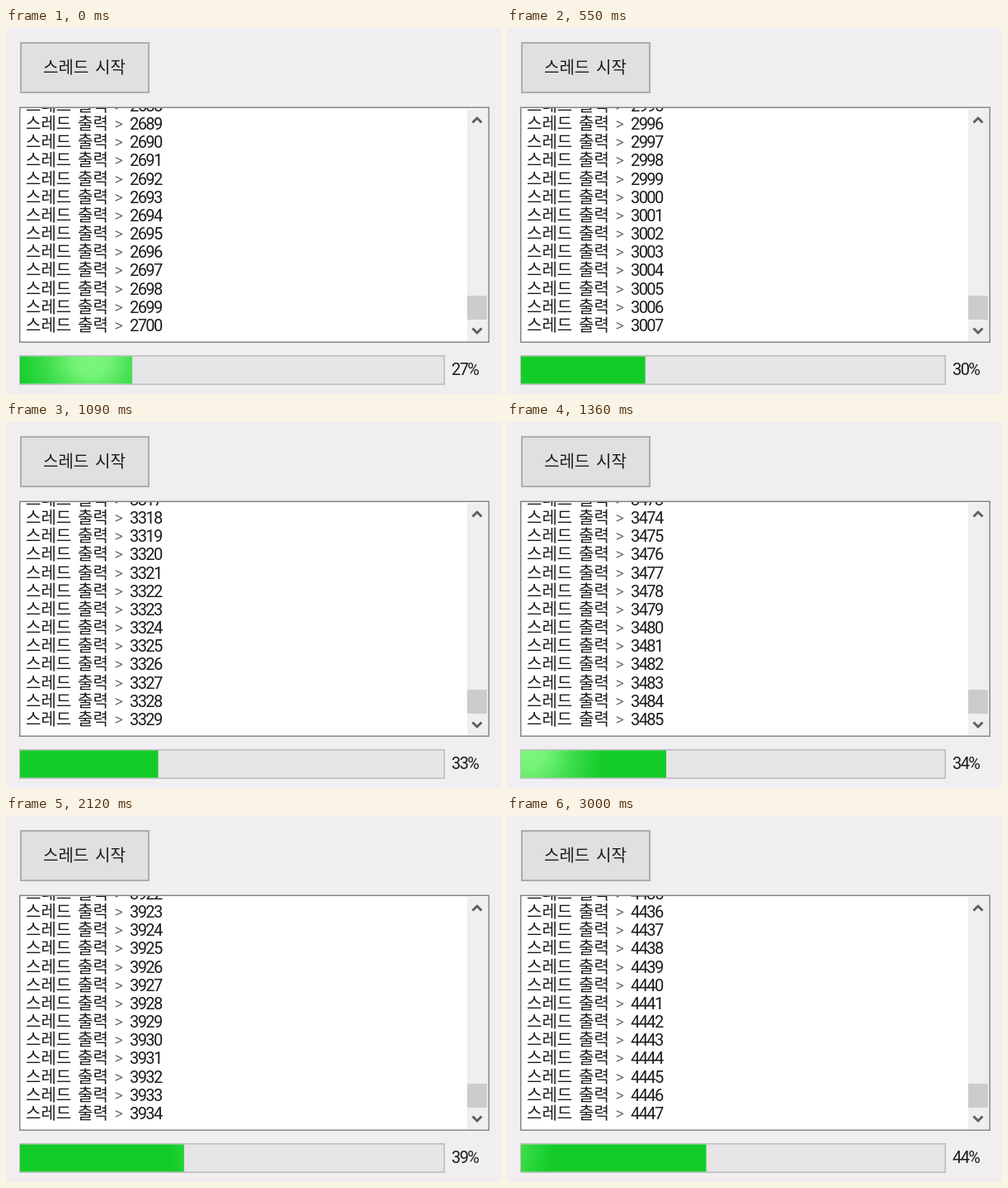
These frames come from a looping animation (600 px wide and 443 px high, 3030 ms). An HTML page:

```html
<!DOCTYPE html>
<html lang="ko">
<head>
<meta charset="utf-8">
<title>스레드 출력</title>
<style>
  html, body { margin: 0; width: 100%; height: 100%; overflow: hidden; background: #f0eef0; }
  svg { display: block; width: 600px; height: 443px; }
  text { font: 20px "Noto Sans CJK KR", "Noto Sans CJK", "Noto Sans CJK JP", sans-serif; fill: #1c1c1c; }
  .num { font: 20px Roboto, "Liberation Sans", sans-serif; letter-spacing: -1.6px; }
  .gt { font: 300 20px Roboto, "Liberation Sans", sans-serif; fill: #444; }
  .arrow { fill: none; stroke: #606060; stroke-width: 3; }
</style>
</head>
<body>
<svg viewBox="0 0 600 443">
  <defs>
    <clipPath id="view"><rect x="18" y="97" width="540" height="282"/></clipPath>
    <radialGradient id="glow" gradientUnits="userSpaceOnUse" cx="0" cy="0" r="1">
      <stop offset="0" stop-color="#7cf67e"/>
      <stop offset=".22" stop-color="#74f377"/>
      <stop offset=".6" stop-color="#3cdd4a"/>
      <stop offset="1" stop-color="#13cc28"/>
    </radialGradient>
  </defs>

  <rect x="18" y="18" width="155" height="60" fill="#e1e0e1" stroke="#adadad" stroke-width="2"/>
  <text y="55"><tspan x="45">스레드</tspan><tspan x="108">시작</tspan></text>

  <rect x="16.75" y="96.25" width="568.5" height="284" fill="#fff" stroke="#85858a" stroke-width="1.5"/>
  <rect x="559" y="98" width="25" height="281" fill="#f0eff0"/>
  <rect x="559" y="324" width="24" height="29" fill="#cdcccd"/>
  <path class="arrow" d="M565.5 114.5L571 109L576.5 114.5M565.5 363.5L571 369L576.5 363.5"/>
  <g id="log" clip-path="url(#view)"></g>

  <rect x="16.75" y="396.75" width="514.5" height="34.5" fill="#e6e4e6" stroke="#bcbcbc" stroke-width="1.5"/>
  <rect id="bar" x="17" y="397.5" height="33" fill="url(#glow)"/>
  <text id="percent" class="num" x="540" y="420"></text>
</svg>
<script>
  const LOOP = 3030, ROWS = 13, LAST_LINE = 367, LINE_HEIGHT = 22.18;
  // time, printed count, right edge of the bar
  const KEYS = [
    [0, 2700, 153], [270, 2834, 159], [790, 3155, 175], [1360, 3485, 193],
    [1760, 3720, 205], [2490, 4153, 227], [3000, 4447, 241.5]
  ];
  const $ = id => document.getElementById(id);
  const log = $("log"), bar = $("bar"), glow = $("glow"), percent = $("percent");

  for (let i = 0; i < ROWS; i++) {
    const y = LAST_LINE - (ROWS - 1 - i) * LINE_HEIGHT;
    log.innerHTML += `<text y="${y}"><tspan x="24">스레드</tspan><tspan x="87">출력</tspan>` +
      `<tspan class="gt" x="131.5">&gt;</tspan><tspan class="num" x="150"></tspan></text>`;
  }
  const numbers = log.querySelectorAll(".num");

  // The screen refreshes every 30 ms, with three slightly longer ticks.
  function refreshTime(t) {
    const lag = t >= 2380 ? 30 : t >= 1490 ? 20 : t >= 400 ? 10 : 0;
    return Math.min(3000, Math.floor((t - lag) / 30) * 30 + lag);
  }

  function valueAt(t, column) {
    let i = 1;
    while (i < KEYS.length - 1 && t > KEYS[i][0]) i++;
    const a = KEYS[i - 1], b = KEYS[i];
    return a[column] + (b[column] - a[column]) * (t - a[0]) / (b[0] - a[0]);
  }

  function glowCenter(t) {
    if (t < 900) return 104 + 0.34 * t;
    if (t < 2600) return 25 + 0.35 * (t - 1360);
    return -37 + 0.35 * (t - 3000);
  }

  function draw(now) {
    const t = refreshTime(now % LOOP);
    const count = Math.round(valueAt(t, 1));
    numbers.forEach((el, i) => { el.textContent = count - ROWS + 1 + i; });
    percent.textContent = Math.floor(count / 100) + "%";
    bar.setAttribute("width", valueAt(t, 2) - 17);
    glow.setAttribute("gradientTransform", `translate(${glowCenter(t)} 402) scale(92 85)`);
  }

  let start;
  function tick(now) {
    start ??= now;
    draw(now - start);
    requestAnimationFrame(tick);
  }
  draw(0);
  requestAnimationFrame(tick);
</script>
</body>
</html>
```
